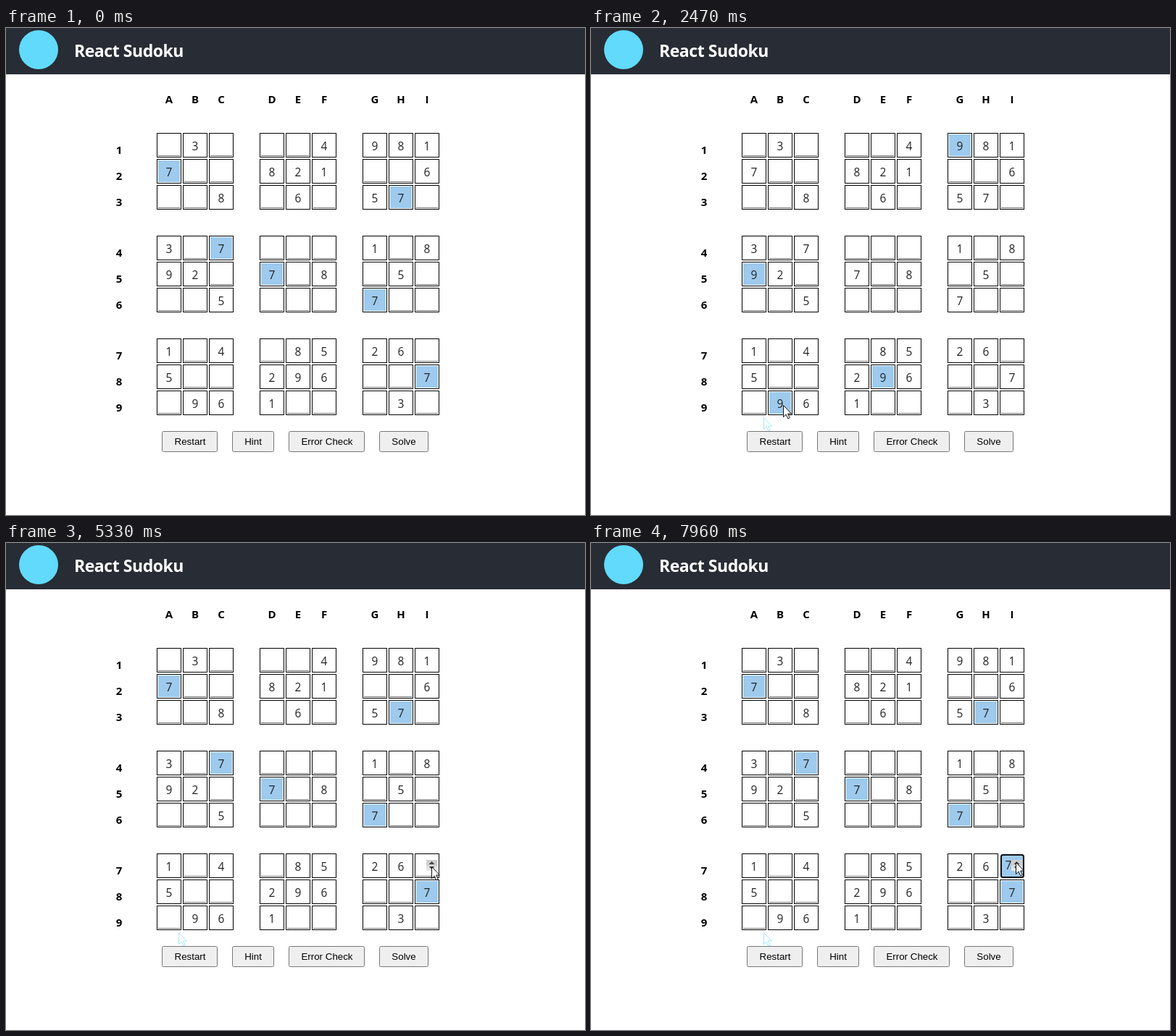
An HTML page for the animation above (8 s loop, 799 by 673 pixels).

```html
<!DOCTYPE html>
<html lang="en">
<head>
<meta charset="utf-8">
<title>React Sudoku</title>
<style>
  html, body { margin: 0; width: 100%; height: 100%; overflow: hidden; background: #fff; }
  svg { display: block; width: 799px; height: 673px; }
  text { font-family: "Open Sans", "Noto Sans", sans-serif; text-anchor: middle; }
  .title { font-size: 23px; font-weight: 700; letter-spacing: -.45px; text-anchor: start; fill: #fff; }
  .label { font-size: 15px; font-weight: 700; }
  .digit { font-size: 15.5px; fill: #222; }
  .button { font: 13.333px "Liberation Sans", Arial, sans-serif; }
</style>
</head>
<body>
<svg id="stage" viewBox="0 0 799 673" xmlns="http://www.w3.org/2000/svg"></svg>
<script>
const LOOP = 8000;
const GRID = ".3...4981 7..821..6 ..8.6.57. 3.7...1.8 92.7.8.5. ..5...7.. 1.4.8526. 5..296..7 .961...3.";
const ARROW = "M.5 .5V16.6L4.2 13L6.7 18.8L9.2 17.7L6.7 12H11.5Z";

// key points of the pointer: time, x, y
const PATH = [
  [910, 214, 668], [1070, 201, 614], [1380, 238, 538], [1780, 264, 530],
  [2470, 265, 521], [2800, 350, 537], [3180, 556, 537], [3470, 582, 479],
  [3900, 587, 510], [4620, 588, 443], [6090, 586, 452], [7960, 586, 441]
];
const ENTER = 910, TRAIL = 1460, NINES = 1790, SEVENS = 3330, SPIN = 4320, TYPED = 5600, CARET = 7720;

const stage = document.getElementById("stage");

function add(tag, attrs, parent = stage, content = "") {
  const el = document.createElementNS("http://www.w3.org/2000/svg", tag);
  for (const key in attrs) el.setAttribute(key, attrs[key]);
  el.textContent = content;
  parent.appendChild(el);
  return el;
}
const rect = (x, y, width, height, fill, more, parent) =>
  add("rect", { x, y, width, height, fill, ...more }, parent);
const text = (x, y, cls, content, parent) => add("text", { x, y, class: cls }, parent, content);
const show = (el, on) => el.setAttribute("visibility", on ? "inherit" : "hidden");
const offset = i => i * 36 + Math.floor(i / 3) * 34;

rect(0, 0, 799, 673, "#fff");
rect(0, 0, 799, 64, "#282c34");
add("circle", { cx: 45, cy: 30, r: 27, fill: "#61dafb" });
text(94, 40, "title", "React Sudoku");

const cells = [];
GRID.split(" ").forEach((row, r) => {
  text(225 + offset(r), 104, "label", "ABCDEFGHI"[r]);
  text(156, 174 + offset(r), "label", r + 1);
  [...row].forEach((digit, c) => {
    const x = 208 + offset(c), y = 145 + offset(r);
    rect(x + .5, y + .5, 33, 33, "#fff", { stroke: "#000" });
    if (digit === ".") {
      rect(x + 2, y + 31, 30, 1, "#767676");
      return;
    }
    const fill = rect(x + 2, y + 2, 30, 30, "#9ecaed");
    text(x + 17, y + 24, "digit", digit);
    cells.push({ digit: +digit, fill });
  });
});

let left = 215;
for (const [label, width] of [["Restart", 77], ["Hint", 58], ["Error Check", 105], ["Solve", 68]]) {
  rect(left + .5, 557.5, width - 1, 28, "#efefef", { stroke: "#767676", rx: 2 });
  text(left + Math.ceil(width / 2), 576, "button", label);
  left += width + 20;
}

// the field being edited
const field = add("g", {});
rect(564, 429, 34, 34, "#fff", {}, field);
rect(566, 431, 31, 31, "#9ecaed", { stroke: "#101010", "stroke-width": 2, rx: 2.5 }, field);
const selection = rect(573, 438, 7, 15, "#2f7fc1", {}, field);
const value = text(576, 451, "digit", "", field);
const caret = rect(580, 438, 1, 15, "#222", {}, field);

const spinner = add("g", {});
rect(580, 438, 15, 15, "#e4e4e4", {}, spinner);
const spinTop = rect(580, 438, 15, 8, "#cfcfcf", {}, spinner);
add("path", { d: "M583.5 444L587.5 440L591.5 444ZM583.5 447L587.5 451L591.5 447Z", fill: "#454545" }, spinner);

const trail = add("path", { d: ARROW, transform: "translate(238 538)", fill: "#fff", stroke: "#a6e6fa" });
const arrow = add("path", { d: ARROW, fill: "#fff", stroke: "#111" });
const beam = add("path", { d: "M-4 -8.5H-1L0 -7.5L1 -8.5H4M0 -7.5V7.5M-4 8.5H-1L0 7.5L1 8.5H4",
                           fill: "none", stroke: "#222" });

function pointer(t) {
  const next = Math.max(1, PATH.findIndex(([time]) => time > t));
  const [t0, x0, y0] = PATH[next - 1], [t1, x1, y1] = PATH[next];
  const k = Math.max(0, (t - t0) / (t1 - t0));
  const ease = k * k * (3 - 2 * k);
  return [x0 + (x1 - x0) * ease, y0 + (y1 - y0) * ease].map(Math.round);
}

// the digit under the pointer, then the one counted up in the field
function litDigit(t) {
  if (t >= TYPED) return Math.max(1, Math.min(7, 1 + Math.floor((t - 5990) / 260)));
  return t >= NINES && t < SEVENS ? 9 : 7;
}

function draw(t) {
  const lit = litDigit(t);
  for (const { digit, fill } of cells) show(fill, digit === lit);

  const selected = t < CARET;
  show(field, t >= TYPED);
  show(selection, selected);
  show(caret, !selected);
  value.textContent = lit;
  value.style.fill = selected ? "#fff" : "#222";

  // over the text of a cell the arrow turns into a beam
  const [x, y] = t < 7960 ? pointer(t) : PATH.at(-1).slice(1);
  const overText = x > 564 && y > 465 && y < 499;
  show(spinner, t >= SPIN);
  show(spinTop, t >= SPIN && y < 450);
  show(trail, t >= TRAIL);
  show(arrow, t >= ENTER && !overText);
  show(beam, overText);
  for (const el of [arrow, beam]) el.setAttribute("transform", `translate(${x} ${y})`);
}

const start = performance.now();
function tick() {
  draw((performance.now() - start) % LOOP);
  requestAnimationFrame(tick);
}
tick();
</script>
</body>
</html>
```
